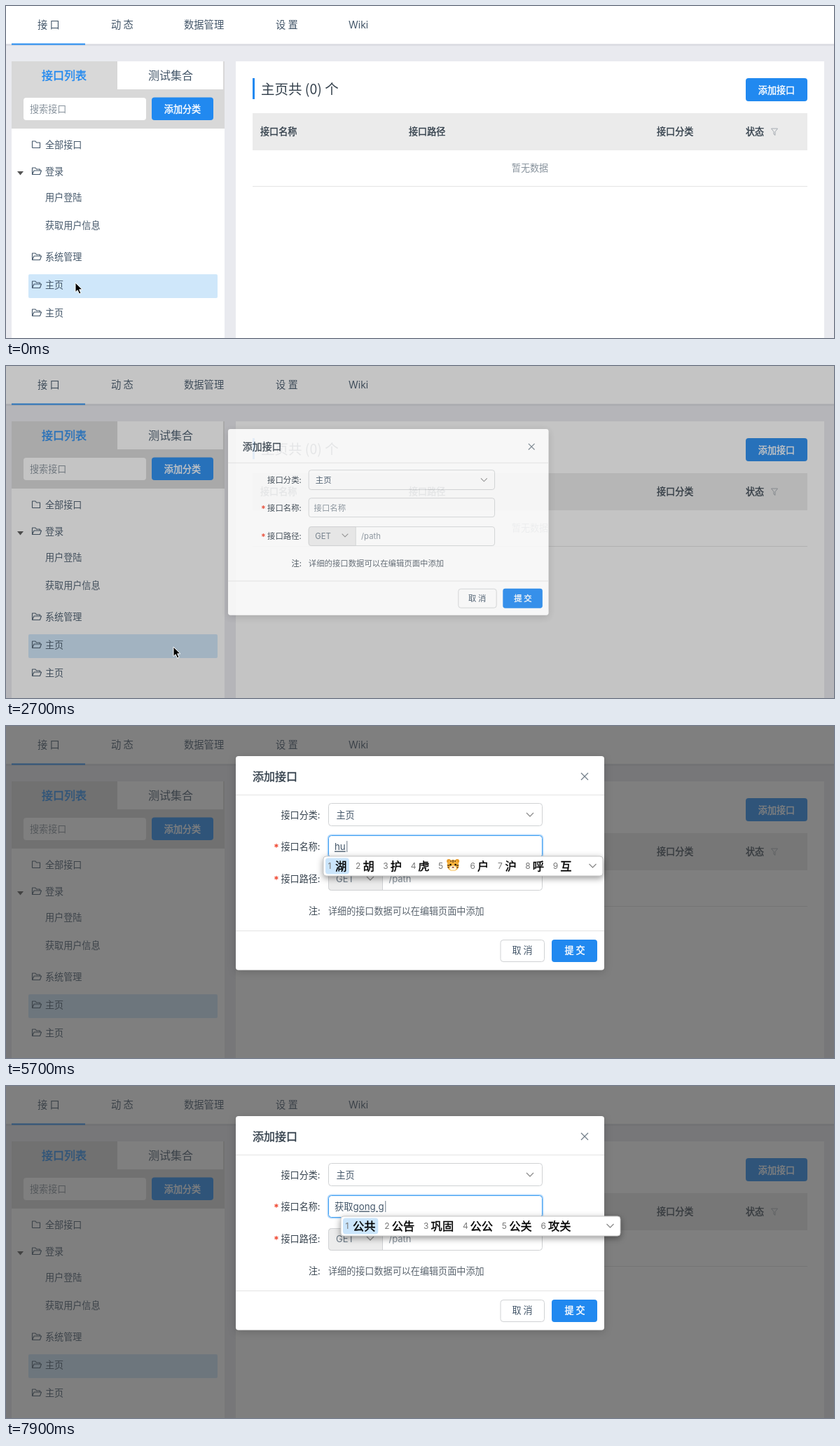
An HTML page for the animation above (8 s loop, 1182x474 px).

```html
<!DOCTYPE html>
<html lang="zh-CN">
<head>
<meta charset="utf-8">
<style>
html, body { margin: 0; width: 100%; height: 100%; overflow: hidden; background: #e9eaef; }
svg { display: block; width: 1182px; height: 474px; font-family: "Noto Sans CJK SC", "Noto Sans CJK", sans-serif; }
.latin { font-family: Inter, "Noto Sans CJK SC", sans-serif; }
.dialog { filter: drop-shadow(0 3px 6px rgba(0,0,0,.16)); }
.popup { filter: drop-shadow(0 3px 5px rgba(0,0,0,.4)); }
</style>
</head>
<body>
<svg viewBox="0 0 1182 474"><g id="page"></g><g id="overlay"></g></svg>
<script>
const LOOP = 8000, STEP = 100;
const BLUE = '#2189f0', INK = '#435669', DARK = '#34404c', HINT = '#87929c', RED = '#f04a34';
const page = document.getElementById('page');
const overlay = document.getElementById('overlay');

// Text is placed by its vertical centre; medium weight is a thin outline on the regular face.
const text = (x, cy, str, { size = 13.1, fill = INK, weight = 400, anchor = 'start', latin = false } = {}) =>
  `<text x="${x}" y="${cy + size * 0.375}" font-size="${size}" fill="${fill}" text-anchor="${anchor}"`
  + (weight === 500 ? ` stroke="${fill}" stroke-width=".4"` : ` font-weight="${weight}"`)
  + `${latin ? ' class="latin"' : ''}>${str}</text>`;
const rect = (x, y, x2, y2, fill, r = 0, stroke = 'none') =>
  `<rect x="${x}" y="${y}" width="${x2 - x}" height="${y2 - y}" rx="${r}" fill="${fill}" stroke="${stroke}"/>`;
const line = (d, stroke, width = 1) =>
  `<path d="${d}" fill="none" stroke="${stroke}" stroke-width="${width}" stroke-linejoin="round"/>`;
const button = (x, y, x2, y2, label) =>
  rect(x, y, x2, y2, BLUE, 4) + text((x + x2) / 2, (y + y2) / 2 + 0.5, label, { fill: '#fff', weight: 500, anchor: 'middle' });
const box = (x, y, x2, y2, stroke = '#d0d2d4', fill = '#fff') => rect(x + .5, y + .5, x2 - .5, y2 - .5, fill, 4, stroke);
const chevron = (x, y, stroke = '#8a8a8a') => line(`M${x - 5} ${y - 3}l5 5 5 -5`, stroke, 1.2);

const folder = (y, open) => line(
  `M37.5 ${y + 4.5}v-9.5h4.5l1.5 2h5v${open ? 2 : 7.5}` + (open ? `M37.5 ${y + 4.5}l2.5 -5.5h10.5l-2 5.5z` : 'h-11'), INK, 1.1);

function drawPage() {
  const nav = [[45, '接 口'], [150, '动 态'], [254, '数据管理'], [385, '设 置']];
  const cats = [[198, '全部接口'], [236, '登录'], [358, '系统管理'], [398, '主页'], [438, '主页']];
  const heads = [[363, '接口名称'], [575, '接口路径'], [929, '接口分类'], [1056, '状态']];
  return rect(0, 0, 1182, 474, '#e9eaef')
    + rect(0, 54, 1182, 57, '#dddee4') + rect(0, 0, 1182, 54, '#fff') + rect(8, 53.5, 113, 55.5, BLUE)
    + nav.map(([x, s]) => text(x, 26.5, s, { size: 14.3 })).join('')
    + text(489, 26.5, 'Wiki', { size: 14, latin: true })
    + rect(8, 79, 312, 474, '#fff') + rect(8, 79, 312, 175, '#d8d8d8') + rect(159, 79, 310, 119, '#fff')
    + text(51, 98.5, '接口列表', { size: 16, fill: BLUE, weight: 500 }) + text(203, 98.5, '测试集合', { size: 16 })
    + rect(25, 131, 200, 163, '#fff', 4) + text(34, 147, '搜索接口', { fill: HINT })
    + button(208, 130.5, 296, 163, '添加分类')
    + rect(32, 383, 302, 417, '#cfe7fa', 2)
    + cats.map(([y, s], i) => folder(y, i > 0) + text(56, y, s)).join('')
    + '<path d="M16 236h9l-4.500 5.500z" fill="#555"/>'
    + text(56, 273, '用户登陆') + text(56, 313, '获取用户信息')
    + rect(328, 79, 1168, 474, '#fff') + rect(352, 103, 355, 133, BLUE)
    + text(364, 118.5, '主页共 (0) 个', { size: 19.5, fill: DARK })
    + button(1056, 103, 1144, 136, '添加接口')
    + rect(352, 153, 1144, 206, '#ebebeb')
    + heads.map(([x, s]) => text(x, 179, s, { fill: DARK, weight: 500 })).join('')
    + line('M1092.500 175h9l-3.500 4.500v5l-2 -1.500v-3.500z', '#a5abb2')
    + text(748, 231, '暂无数据', { fill: HINT, anchor: 'middle' })
    + rect(352, 257, 1144, 258, '#e4e4e4');
}

function rowTools(t) {
  if (t < 1200 || t >= 2600) return '';
  const onEdit = t >= 1700 && t < 2100;
  const tip = t < 1500 ? '' : rect(206, 340, 276, 373, '#2b2d30', 4)
    + '<path d="M236 373h10l-5 5.500z" fill="#2b2d30"/>'
    + text(241, 356.5, '添加接口', { fill: '#fff', weight: 500, anchor: 'middle' });
  return line('M235.500 398h11M241 392.500v11', INK, 1.2)
    + line('M259.500 402.500l1 -3.500 7 -7 2.500 2.500 -7 7z', onEdit ? BLUE : INK, 1.4)
    + line('M284 393.500h12M287.500 393v-2h5v2M285.500 394v9.500h9v-9.500M288.500 396.500v5M291.500 396.500v5', INK, 1.3) + tip;
}

// Linear interpolation over rows of [time, ...values].
function along(rows, t) {
  const i = rows.findIndex(r => r[0] > t);
  if (i < 0) return rows[rows.length - 1].slice(1);
  const a = rows[i - 1], b = rows[i], k = (t - a[0]) / (b[0] - a[0]);
  return a.slice(1).map((v, j) => v + (b[j + 1] - v) * k);
}

// time, dialog scale and opacity, mask progress
const OPENING = [[0, 0, 0], [2600, 0, 0], [2700, .87, .46], [2800, .98, .87], [2900, 1, 1]];

const CURSOR = [[0, 99, 395], [1100, 99, 395], [1500, 238, 398], [1700, 260, 397], [1900, 260, 397],
  [2300, 239, 401], [2800, 239, 401], [3100, 510, 190], [3200, 535, 172], [3800, 540, 167]];
const TYPING_FROM = 4900;

const SINGLE = {
  h: '和会好或后还很话回', hu: '湖胡护虎*户沪呼互', huo: '或活火货获祸惑霍伙',
  g: '个该给过高更国跟干', gong: '公共工供功宫弓攻贡'
};
const words = s => s.split(' ');
const CANDIDATES = {
  'huo qu': words('获取 或取 火曲 货区 活去 或去'),
  'gong g': words('公共 公告 巩固 公公 公关 攻关')
};
const typing = (pinyin, done = '') => ({ border: 'focus', pinyin, done, ime: pinyin });
const STATES = [
  [0, {}], [3200, { border: 'hover' }], [3700, { border: 'focus' }], [4000, { border: 'focus', list: true }],
  [TYPING_FROM, typing('h')], [5100, typing('hu')], [6400, { border: 'error', ime: 'hu' }],
  [6600, typing('h')], [6800, typing('huo')], [7000, typing('huo qu')],
  [7200, { border: 'focus', done: '获取' }], [7400, typing('g', '获取')], [7600, typing('gong', '获取')], [7800, typing('gong g', '获取')]
];
const stateAt = t => STATES.filter(([at]) => at <= t).pop()[1];

const label = (y, str, required) => text(392.5, y, str + ':', { fill: DARK })
  + (required ? text(382, y + 1, '*', { fill: RED, size: 14, weight: 700, latin: true }) : '');

function nameField({ border, done = '', pinyin = '' }) {
  const color = { hover: '#5fb0f5', focus: '#3a9cf2', error: RED }[border];
  const glow = border === 'focus' || border === 'error'
    ? `<rect x="459.500" y="155.500" width="307" height="33" rx="5" fill="none" stroke="${color}" stroke-opacity=".35" stroke-width="2"/>` : '';
  const value = done || pinyin
    ? text(469, 172.5, `${done}<tspan text-decoration="underline">${pinyin}</tspan><tspan font-weight="300">|</tspan>`, { latin: true, size: 13.3 })
    : text(469, 172.5, '接口名称', { fill: HINT });
  return glow + box(460, 156, 766, 188, color) + value;
}

function dialog(state) {
  const bad = state.border === 'error', drop = bad ? 38.5 : 0;
  const submit = bad
    ? box(779, 305, 844, 337, '#d0d0d0', '#f4f4f4') : rect(779, 305, 844, 337, BLUE, 4);
  return `<g class="dialog">${rect(328, 43, 854, 348.5 + drop, '#fff', 4)}</g>`
    + text(352, 72, '添加接口', { size: 16, fill: DARK, weight: 500 })
    + line('M821 67l10 10M831 67l-10 10', '#74808b', 1.3)
    + rect(328, 98, 854, 99, '#e4e4e4')
    + label(127, '接口分类') + box(460, 110, 766, 143) + text(471.5, 127, '主页') + chevron(748, 127)
    + label(172.5, '接口名称', true) + nameField(state)
    + (bad ? text(460, 199, '请输入接口名称,长度不超过100字符(中文算作2字', { fill: RED, size: 12.8 })
      + text(460, 219, '符)!!', { fill: RED }) : '')
    + `<g transform="translate(0 ${drop})">`
    + label(218.5, '接口路径', true) + box(460, 203, 766, 235)
    + '<path d="M537.500 203.500h-73a4 4 0 0 0 -4 4v23a4 4 0 0 0 4 4h73z" fill="#ececec" stroke="#d0d2d4"/>'
    + text(471, 218.5, 'GET', { latin: true, size: 13, fill: '#697784' }) + chevron(520, 218)
    + text(546.5, 218.5, '/path', { latin: true, size: 13, fill: HINT })
    + text(432, 264, '注:', { fill: DARK }) + text(460, 264, '详细的接口数据可以在编辑页面中添加', { fill: '#59636d' })
    + rect(328, 292, 854, 293, '#e4e4e4')
    + box(705.5, 305, 769, 337) + text(737, 320.5, '取 消', { anchor: 'middle' })
    + submit + text(812, 320.5, '提 交', { fill: bad ? '#8d8d8d' : '#fff', weight: bad ? 400 : 500, anchor: 'middle' })
    + '</g>';
}

const suggestions = () => `<g class="popup">${rect(460, 189, 769, 265, '#fff', 0, '#aaa')}</g>`
  + ['获取用户信息', '用户登陆', '获取公告信息'].map((s, i) =>
    text(470, 203 + 24.3 * i, s, { size: 13.3, fill: '#000', weight: 700 })).join('');

const tiger = (x, y) => `<g transform="translate(${x} ${y})">`
  + '<circle cx="-6" cy="-6" r="3" fill="#e99a25"/><circle cx="6" cy="-6" r="3" fill="#e99a25"/>'
  + '<ellipse rx="8.500" ry="8" fill="#f5b13a"/><ellipse cy="4" rx="5" ry="3.500" fill="#fff3d6"/>'
  + line('M0 -8v4M-3 -7v2M3 -7v2M-8 0h3M8 0h-3M-7.500 3h2M7.500 3h-2', '#5a3718', 1.3)
  + '<circle cx="-3.500" cy="-1" r="1.200"/><circle cx="3.500" cy="-1" r="1.200"/><path d="M-2 2h4l-2 2z" fill="#8a3c2c"/></g>';

function imeBar(state) {
  const items = CANDIDATES[state.ime] || [...SINGLE[state.ime]];
  const left = state.done ? 478 : 453, span = items[0].length * 16.4;
  let x = left + 6.5, out = '';
  items.forEach((word, i) => {
    out += text(x, 199.5, i + 1, { size: 12, fill: '#777', latin: true });
    out += word === '*' ? tiger(x + 21, 199) : text(x + 10.5, 199.5, word, { size: 16.3, fill: '#000', weight: 500 });
    x += span + 23 + (word === '*' ? 6 : 0);
  });
  return `<g class="popup">${rect(left, 186, left + 399, 214, '#fff', 4, '#c8c8c8')}</g>`
    + rect(left + 3, 188.5, left + 20.5 + span, 211.5, '#cbe5fb', 4) + out + chevron(left + 384.500, 200);
}

const POINTERS = {
  arrow: '<path d="M0 0v13.500l3.200 -2.800 2.300 5.300 2.500 -1 -2.300 -5.200h4.300z" fill="#000" stroke="#fff"/>',
  hand: '<path d="M1 1.500q1.500 -1.500 2.500 0l1.200 5q1.500 -1 2.300 .5 1.500 -.6 2.200 .6 1.800 -.4 2 1.400l-.4 3.500 -1 2v2h-6v-2l-4 -4.500q-1 -2 1.200 -1.500l1.500 1.200z" fill="#fff" stroke="#000" stroke-width="1.100"/><path d="M6 11v3M8 11v3" stroke="#000" stroke-width=".8"/>',
  beam: '<path d="M-3 -8q2.500 0 3 2q.5 -2 3 -2M-3 8q2.500 0 3 -2q.5 2 3 2M0 -6v12M-1.500 2h3" fill="none" stroke="#111" stroke-width="1.300"/>'
};

// The pointer hides while keys are pressed.
function pointer(t) {
  if (t >= TYPING_FROM) return '';
  const [x, y] = along(CURSOR, t);
  const kind = t >= 3200 ? 'beam' : t >= 3000 || (t >= 1400 && t < 2600) ? 'hand' : 'arrow';
  return `<g transform="translate(${x} ${y})">${POINTERS[kind]}</g>`;
}

function render(t) {
  const [scale, mask] = along(OPENING, t);
  const state = stateAt(t);
  let out = rowTools(t);
  if (scale > 0) {
    out += `<rect width="1182" height="474" fill="#373737" opacity="${0.64 * mask}"/>`
      + `<g opacity="${scale}" transform="translate(243 404) scale(${scale}) translate(-243 -404)">${dialog(state)}</g>`;
  }
  if (state.list) out += suggestions();
  if (state.ime) out += imeBar(state);
  overlay.innerHTML = out + pointer(t);
}

page.innerHTML = drawPage();
const start = performance.now();
let shown = -1;
function tick() {
  const t = Math.floor((performance.now() - start) % LOOP / STEP) * STEP;
  if (t !== shown) render(shown = t);
  requestAnimationFrame(tick);
}
tick();
</script>
</body>
</html>
```
